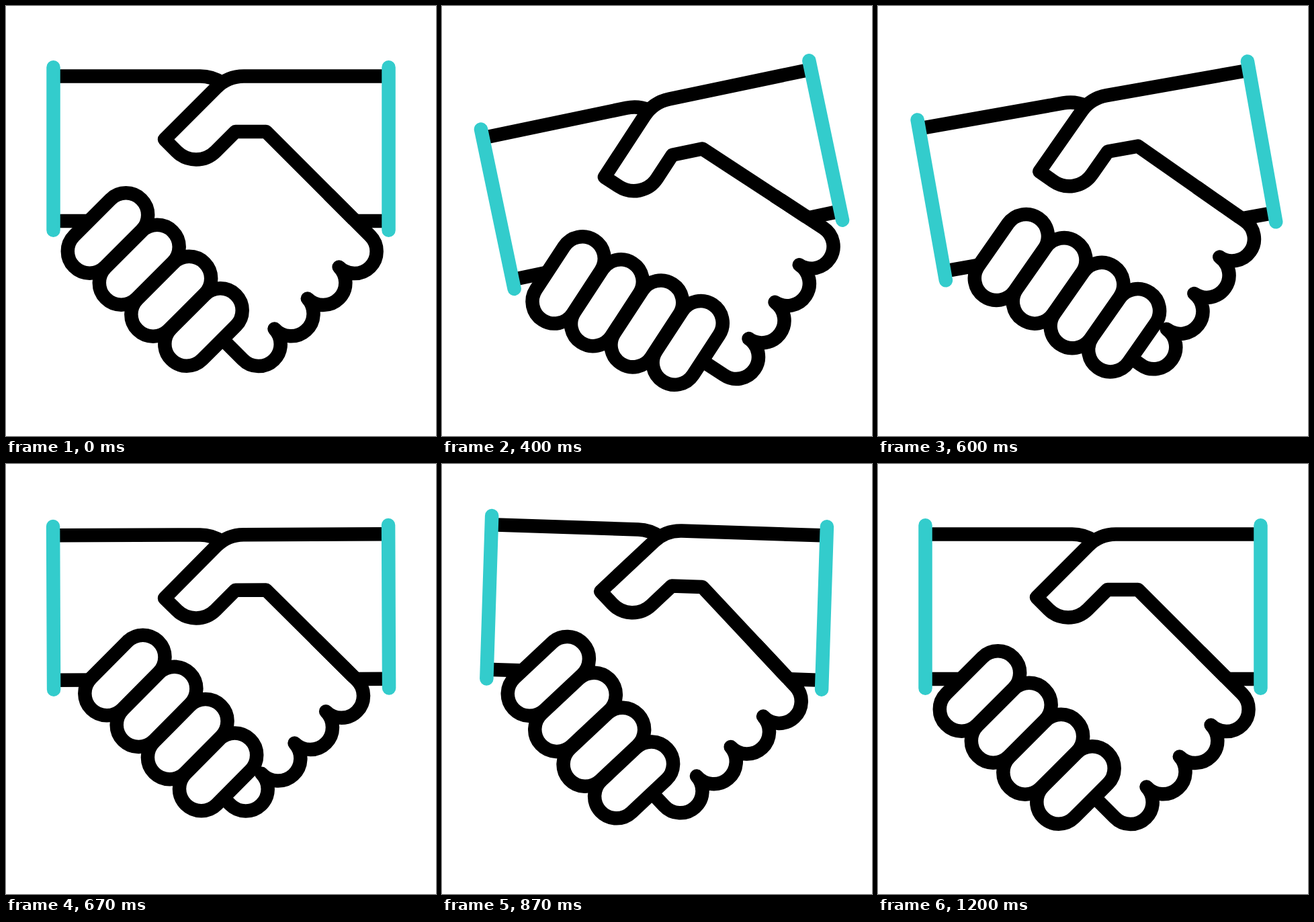
Animation of 640x640 px, one loop 1670 ms. Source, as an HTML page:

```html
<!DOCTYPE html>
<html lang="en">
<head>
<meta charset="utf-8">
<title>Handshake</title>
<style>
  html, body { margin: 0; width: 100%; height: 100%; overflow: hidden; background: #fff; }
  svg { display: block; width: 100%; height: 100%; }
</style>
</head>
<body>
<svg viewBox="0 0 640 640" fill="none" stroke="#000" stroke-width="20.5" stroke-linejoin="round">
  <g id="hands">
    <path d="M70 104.5H289A58 58 0 0 1 321 114.1M70 320H126M570 320H522"/>
    <path d="M570 104.5H354A58 58 0 0 0 313 121.5L236 198.5L254 216.5A41 41 0 0 0 312 216.5L341.5 187H387L518 318"/>
    <path id="knuckles" d="M480 280L542 342A32.7 32.7 0 0 1 495.6 388.4A32.7 32.7 0 0 1 448.8 435.4A32.7 32.7 0 0 1 399.5 480.5A32.7 32.7 0 0 1 352.4 526.1L322 495.7"/>
    <g id="fingers" fill="#fff"></g>
    <path d="M70.5 91.2V333.8M569.5 91.2V333.8" stroke="#33cccc" stroke-linecap="round"/>
  </g>
</svg>
<script>
const LOOP = 1670;
const PIVOT = [510, 198];
const RADIUS = 32.7;
const GRIP = 25.2;
const SQUEEZE = 20.5;

// [frame, degrees]
const SWING = [[7.1, 0], [15.04, -17], [22.8, 6], [29.5, -3], [36, 0]];

// Lower end of each finger's axis and its horizontal reach, from the lowest finger up.
const FINGERS = [[269, 503, 50], [219, 459, 53.5], [171.5, 412, 53.5], [124.5, 365, 54]];

const byId = id => document.getElementById(id);
const hands = byId('hands');
const knuckles = byId('knuckles');

const fingers = FINGERS.map(([x, y, reach]) => {
  const finger = document.createElementNS('http://www.w3.org/2000/svg', 'rect');
  const length = reach * Math.SQRT2 + 2 * RADIUS;
  const attributes = {
    x: x - RADIUS, y: y - RADIUS, width: length, height: 2 * RADIUS,
    rx: RADIUS, transform: `rotate(-45 ${x} ${y})`
  };
  for (const name in attributes) finger.setAttribute(name, attributes[name]);
  const slider = document.createElementNS('http://www.w3.org/2000/svg', 'g');
  slider.append(finger);
  byId('fingers').append(slider);
  return slider;
});

// cubic-bezier(.42, 0, .58, 1)
function easeInOut(x) {
  let u = x;
  for (let i = 0; i < 6; i++) {
    const error = 1.26 * u - 0.78 * u * u + 0.52 * u ** 3 - x;
    u -= error / (1.26 - 1.56 * u + 1.56 * u * u);
  }
  return u * u * (3 - 2 * u);
}

function valueAt(keys, frame) {
  if (frame <= keys[0][0]) return keys[0][1];
  for (let i = 1; i < keys.length; i++) {
    const [start, from] = keys[i - 1];
    const [end, to] = keys[i];
    if (frame < end) return from + (to - from) * easeInOut((frame - start) / (end - start));
  }
  return keys[keys.length - 1][1];
}

const pulse = (frame, start, peak, end, size) =>
  valueAt([[start, 0], [peak, size], [end, 0]], frame);

// Thirty frames a second, starting at 0, 30 and 70 ms of every 100 ms.
function frameAt(ms) {
  const rest = ms % 100;
  return 3 * Math.floor(ms / 100) + (rest >= 30) + (rest >= 70);
}

function draw(ms) {
  const frame = frameAt(ms);
  hands.setAttribute('transform', `rotate(${valueAt(SWING, frame)} ${PIVOT})`);
  fingers.forEach((finger, i) => {
    const slide = pulse(frame, 7 + 1.35 * i, 17 + 1.25 * i, 27 + 1.15 * i, GRIP);
    finger.setAttribute('transform', `translate(${slide} ${-slide})`);
  });
  const slide = -pulse(frame, 9, 21, 32, SQUEEZE);
  knuckles.setAttribute('transform', `translate(${slide} ${slide})`);
}

const begin = performance.now();
function tick() {
  draw((performance.now() - begin) % LOOP);
  requestAnimationFrame(tick);
}
draw(0);
requestAnimationFrame(tick);
</script>
</body>
</html>
```
